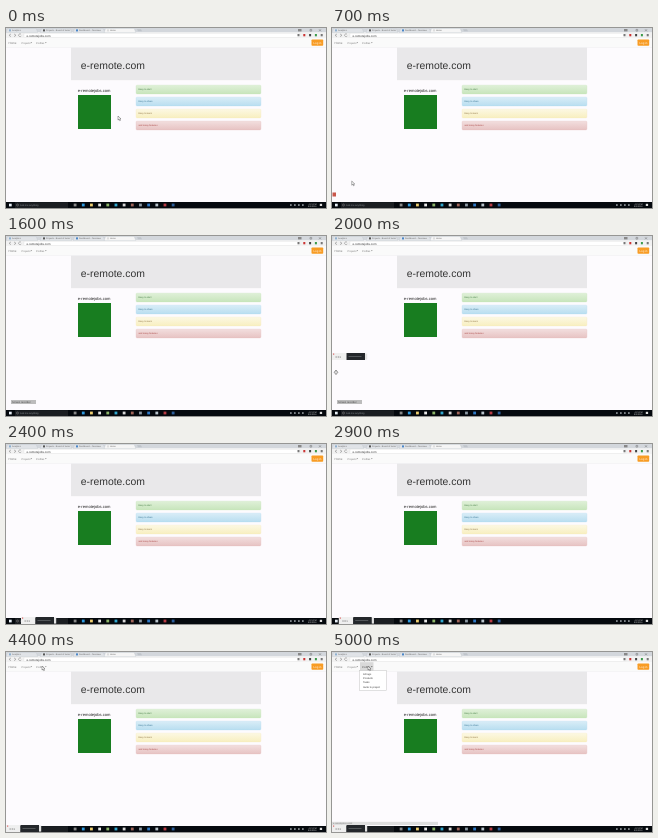
An HTML page that plays this animation: 320x180 px, repeating every 5.1 s.

```html
<!DOCTYPE html>
<html lang="en">
<head>
<meta charset="utf-8">
<title>Desktop recording</title>
<style>
  html, body { margin: 0; width: 100%; height: 100%; overflow: hidden; background: #fff; }
  svg { display: block; width: 100vw; height: 100vh; font-family: "Liberation Sans", Arial, sans-serif; text-rendering: geometricPrecision; }
</style>
</head>
<body>
<svg id="stage" viewBox="0 0 320 180">
  <defs id="defs"></defs>
  <g id="page"></g>
  <g id="hover"></g>
  <g id="menu"></g>
  <g id="taskbar"></g>
  <g id="status"></g>
  <g id="icon"></g>
  <g id="tip"></g>
  <g id="note"></g>
  <g id="recorder"></g>
  <g id="mover"></g>
  <g id="cursor"></g>
</svg>
<script>
const LOOP = 5100, STEP = 100;
const $ = id => document.getElementById(id);
const rect = (x, y, w, h, fill, extra = '') =>
  `<rect x="${x}" y="${y}" width="${w}" height="${h}" fill="${fill}" ${extra}/>`;
const text = (x, y, size, str, fill = '#777', extra = '') =>
  `<text x="${x}" y="${y}" font-size="${size}" fill="${fill}" ${extra}>${str}</text>`;
const path = (d, fill, extra = '') => `<path d="${d}" fill="${fill}" ${extra}/>`;
const caret = (x, y, fill) => path(`M${x} ${y}h1.6l-.8 .9z`, fill);

// top colour, bottom colour, border, text colour, label
const alerts = [
  ['#dff0d8', '#c8e5bc', '#bfdfb0', '#3c763d', 'Easy to start'],
  ['#d9edf7', '#b9def0', '#abd5ec', '#31708f', 'Easy to share'],
  ['#fcf8e3', '#f8efc0', '#f3e8b4', '#8a6d3b', 'Easy to learn'],
  ['#f2dede', '#e7c3c3', '#dfb5b5', '#a94442', 'and many features']
];

function browser() {
  const tabs = [[0, 'Analytics', '#8fb0cf'], [34, 'Projects - Board of tasks', '#555'],
                [67, 'Dashboard - Overview', '#4a86c8'], [98, 'Home', '#ddd']];
  let s = rect(0, 0, 320, 4.5, '#d3d7dc') + rect(0, 4.5, 320, 5.5, '#f2f2f2');
  tabs.forEach(([x, label, color], i) => {
    const active = i === 3;
    s += path(`M${x} 4.6l1.6-4.2h28.6l1.6 4.2z`, active ? '#f5f5f5' : '#e0e3e7', 'stroke="#b9bec4" stroke-width=".3"');
    s += rect(x + 3, 1.4, 2, 2, color) + text(x + 6, 3.3, 2.2, label, '#666');
  });
  s += path('M131 1.2h4l1 2h-4z', '#bfc4ca');
  s += path('M304 1.4h1.7v1.7h-1.7zM313 1.3l2 2m0-2l-2 2', 'none', 'stroke="#555" stroke-width=".4"') + rect(292, 1, 3.5, 2.4, '#888');
  s += path('M5 5.9L3 7.3l2 1.4M8 5.9l2 1.4-2 1.4M15 6.2a1.4 1.4 0 1 0 .3 1.6', 'none', 'stroke="#777" stroke-width=".5"');
  s += rect(18, 5.2, 276, 4.2, '#fff', 'stroke="#d9d9d9" stroke-width=".3"');
  s += text(20.5, 8.5, 3, 'e-remotejobs.com', '#333');
  ['#777', '#c33', '#444', '#3a9a4a', '#777'].forEach((color, i) => s += rect(291.5 + 5.8 * i, 6, 2, 2.3, color));
  return s;
}

function site() {
  let s = rect(0, 10, 320, 164, '#fdfbfe') + rect(0, 10, 320, 9, '#fafafa') + rect(0, 19, 320, .4, '#e7e7e7');
  s += text(2.5, 15.7, 3, 'Home') + text(15.5, 15.7, 2.5, 'Projects') + caret(24.5, 14.3, '#777');
  s += text(30, 15.7, 2.5, 'Profiles') + caret(39, 14.3, '#777');
  s += rect(305.5, 11.5, 11.7, 6.3, '#f89c24', 'rx=".8"') + text(311.4, 15.6, 2.9, 'Log in', '#fff', 'text-anchor="middle"');
  s += rect(65, 19.6, 190, 32.6, '#e9e8ea') + text(74.8, 41, 10.4, 'e-remote.com', '#333');
  s += text(71.7, 64.3, 4.1, 'e-remotejobs.com', '#222') + rect(72, 67, 33, 34, '#187d20');
  alerts.forEach(([, , border, color, label], i) => {
    const y = 57.2 + 12 * i;
    s += rect(130.1, y, 124.8, 8.7, `url(#alert${i})`, `rx=".8" stroke="${border}" stroke-width=".3"`);
    s += text(132.5, y + 5.1, 2.3, label, color);
  });
  return s;
}

function taskbar() {
  const icons = ['#888', '#2f9be0', '#efcf70', '#e8e8e8', '#8db56a', '#31a7ce', '#d8d8d8',
                 '#a0655a', '#8d9aa5', '#2f79c6', '#b9c4cc', '#b83b44', '#2d5f9c'];
  let s = rect(0, 174, 320, 6, '#05090e') + rect(3, 175.7, 2.7, 2.7, '#e8f0f7');
  s += rect(9, 174.2, 53, 5.8, '#1b1e22') + text(14, 178, 2.5, 'Ask me anything', '#858a8f');
  s += '<circle cx="11.5" cy="177" r="1" fill="none" stroke="#aaa" stroke-width=".4"/>';
  icons.forEach((color, i) => s += rect(67.7 + 8.17 * i, 175.6, 2.8, 2.8, color));
  for (let i = 0; i < 4; i++) s += rect(284 + 4 * i, 176.2, 1.7, 1.7, '#8d9398');
  s += text(302.5, 176.7, 2.2, '4:21 PM', '#ccc') + text(302, 179.2, 2.2, '8/3/2016', '#ccc');
  return s + rect(313.8, 175.8, 2.3, 2.2, '#ddd');
}

function build() {
  $('defs').innerHTML = alerts.map(([top, bottom], i) =>
    `<linearGradient id="alert${i}" x2="0" y2="1"><stop stop-color="${top}"/><stop offset="1" stop-color="${bottom}"/></linearGradient>`).join('');
  $('page').innerHTML = browser() + site();
  $('taskbar').innerHTML = taskbar();
  $('hover').innerHTML = rect(28, 10.2, 13.5, 8.7, '#d9d9d9') + text(30, 15.7, 2.5, 'Profiles', '#444') + caret(39, 14.3, '#444');
  $('menu').innerHTML = rect(27.6, 18.7, 26.8, 19.6, '#fff', 'stroke="#c4c4c4" stroke-width=".5"') +
    ['All tags', 'Products', 'Tasks', 'Invite to project'].map((s, i) => text(31, 22.6 + 4.4 * i, 2.5, s, '#333')).join('');
  $('status').innerHTML = rect(0, 169.8, 106, 3.2, '#dedede') + text(1, 172.2, 2.2, 'e-remotejobs.com/#', '#777');
  $('icon').innerHTML = rect(.5, 164.5, 3.5, 4, '#c9574b');
  $('tip').innerHTML = rect(5, 164, 28, 8.5, '#777') + rect(5.5, 164.5, 25, 3.5, '#d5d5d5') +
    text(6, 167.3, 2.5, 'Screen recorder', '#333') + text(6, 171.4, 2.4, 'Start recording', '#eee') + rect(30, 168.5, 3, 4, '#222');
  $('note').innerHTML = rect(5, 164, 25, 4, '#bcbcbc') + text(6, 167, 2.6, 'Screen recorder', '#444');
  $('recorder').innerHTML = rect(0, 0, 14.5, 7, '#efefef') + rect(14.5, 0, 18.5, 7, '#24272b') +
    rect(33, .6, 2.2, 6, '#e4e4e4') + rect(1, .5, 1.2, 1.2, '#d66') + text(3.5, 4.5, 2.8, '0:01', '#666') + rect(16.5, 3, 13, .7, '#666a6e');
  $('mover').innerHTML = path('M4 134l1.8 2.3L4 138.6l-1.8-2.3z', '#ddd', 'stroke="#555" stroke-width=".6"');
  $('cursor').innerHTML = path('M0 0v4.1l1-.9.7 1.5.7-.3-.7-1.5h1.3z', '#fff', 'stroke="#333" stroke-width=".4"');
}

// keys: [step, x, y], linear between
function along(keys, n) {
  const i = keys.findIndex(k => k[0] > n);
  if (i < 0) return keys[keys.length - 1].slice(1);
  const [a, ax, ay] = keys[i - 1], [b, bx, by] = keys[i];
  const f = (n - a) / (b - a);
  return [ax + (bx - ax) * f, ay + (by - ay) * f];
}

const pointer = [[0, 112, 88], [1, 111, 88.5], [2, 111, 88.5], [8, 1.5, 166], [14, 1.5, 166],
  [20, 4, 136], [24, 21, 175], [32, 9, 175], [35, 9, 175], [38, 113, 62], [39, 113, 62], [43, 36, 14]];
const dragged = [[0, 0, 117], [20, 0, 117], [22, 52, 172.5], [24, 15, 173], [26, 27, 173], [30, 0, 173]];

const show = (id, on) => $(id).setAttribute('visibility', on ? 'visible' : 'hidden');
const move = (id, [x, y]) => $(id).setAttribute('transform', `translate(${x} ${y})`);

function draw(now) {
  const n = Math.floor(now % LOOP / STEP);
  const within = (a, b) => n >= a && n < b;
  show('icon', within(1, 15));
  show('tip', within(10, 15));
  show('note', within(15, 21));
  show('recorder', n >= 17);
  show('mover', within(17, 21));
  show('cursor', n < 15 || n >= 36);
  show('hover', n >= 46);
  show('menu', n >= 47);
  show('status', n >= 46);
  move('recorder', along(dragged, n));
  move('cursor', along(pointer, n));
  requestAnimationFrame(draw);
}

build();
draw(performance.now());
</script>
</body>
</html>
```
